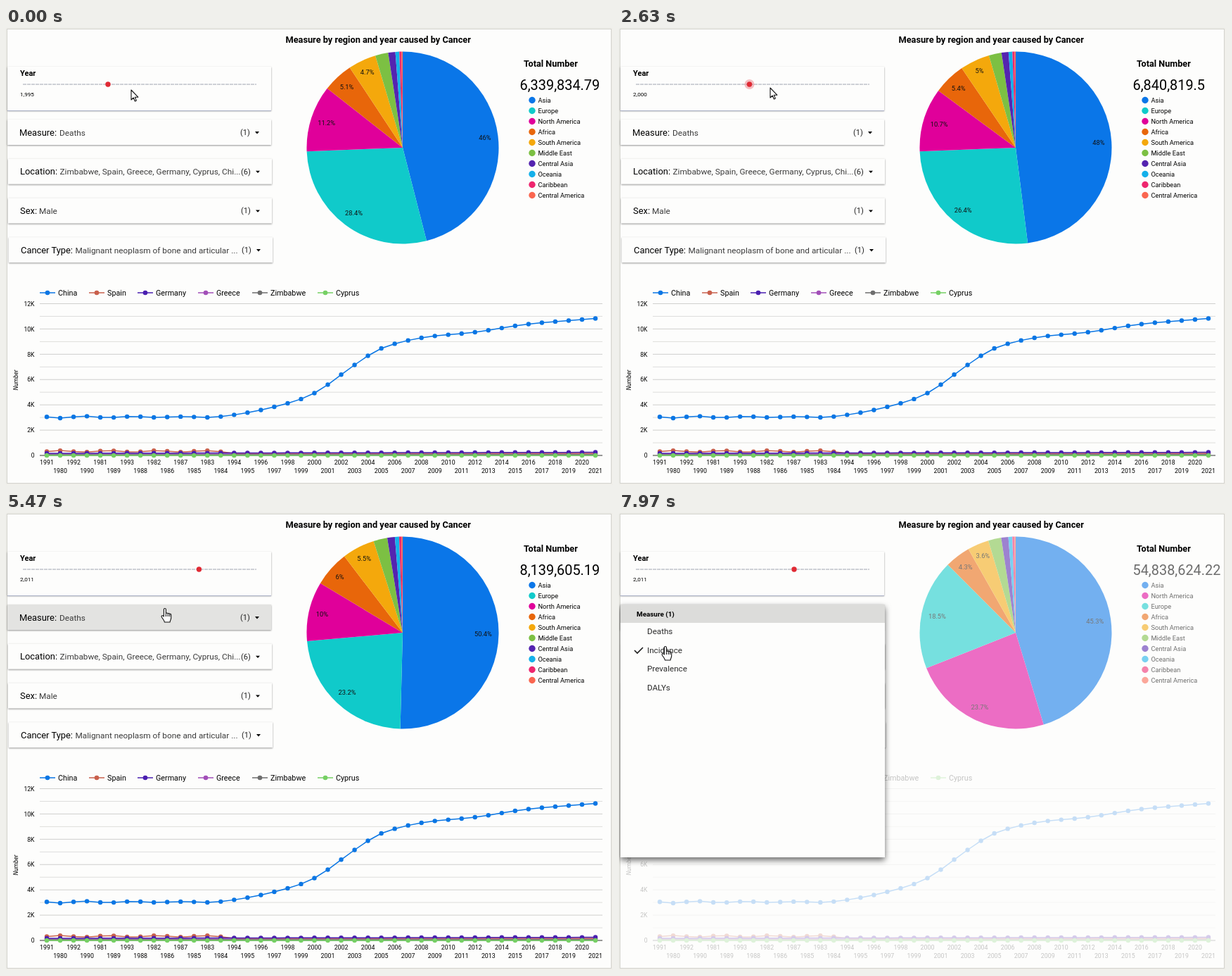
An HTML page for the animation above (8000 ms loop, 863x649 px).

```html
<!DOCTYPE html>
<html lang="en">
<head>
<meta charset="utf-8">
<title>Measure dashboard</title>
<style>
html, body { margin: 0; width: 100%; height: 100%; overflow: hidden; background: #efeee9; }
svg { display: block; width: 863px; height: 649px; font-family: Roboto, sans-serif; }
.card { fill: #fdfdfc; filter: drop-shadow(0 1px 1px rgba(0, 0, 0, .42)); }
.popup { fill: #fdfdfc; filter: drop-shadow(0 4px 4px rgba(0, 0, 0, .58)); }
</style>
</head>
<body>
<svg id="stage" viewBox="0 0 863 649" xmlns="http://www.w3.org/2000/svg"></svg>
<script>
const LOOP = 8000, FADE_MS = 250, DIM = .22;
const REGIONS = {
  'Asia': '#0a76e8', 'Europe': '#10caca', 'North America': '#e0009a', 'Africa': '#e8660a',
  'South America': '#f4a80c', 'Middle East': '#7cc043', 'Central Asia': '#5424b0',
  'Oceania': '#14b0ea', 'Caribbean': '#ee266e', 'Central America': '#fa6650'
};
const names = Object.keys(REGIONS);
const swapped = ['Asia', 'North America', 'Europe', ...names.slice(3)];

// Each result replaces the previous one after a loading phase: dim at `asked`, return at `from`.
const RESULTS = [
  { asked: -2000, from: -1000, total: '6,339,834.79', order: names, top: [46, 28.4, 11.2, 5.1, 4.7] },
  { asked: 1050, from: 1850, total: '6,840,819.5', order: names, top: [48, 26.4, 10.7, 5.4, 5] },
  { asked: 3370, from: 4230, total: '8,139,605.19', order: names, top: [50.4, 23.2, 10, 6, 5.5] },
  { asked: 7200, from: 7860, total: '54,838,624.22', order: swapped, top: [45.3, 23.7, 18.5, 4.3, 3.6] }
];
// The five smallest regions split what is left, each about half of the one before.
const TAIL = Array.from({ length: 5 }, (_, i) => .55 ** i);
const TAIL_SUM = TAIL.reduce((a, b) => a + b);

const PRESS = 650, PRESS_AGAIN = 3000, HOVER = 5100, OPEN = 5950, CHOOSE = 7150;
const MOVES = [
  { start: 100, end: 520, x: 146, y: 80 }, { start: PRESS, end: 1050, x: 188, y: 80 },
  { start: 1700, end: 2200, x: 215, y: 85 }, { start: 2640, end: 2900, x: 187, y: 80 },
  { start: PRESS_AGAIN, end: 3420, x: 274, y: 80 }, { start: 4300, end: 5200, x: 226, y: 136 },
  { start: 6000, end: 6700, x: 66, y: 190 }
];

const ramp = (t, a, b) => Math.min(1, Math.max(0, (t - a) / (b - a)));
const ease = k => k * k * (3 - 2 * k);

const text = (x, y, size, str, extra = '') =>
  `<text x="${x}" y="${y}" font-size="${size}" ${extra}>${str}</text>`;
const rect = (x, y, w, h, extra) => `<rect x="${x}" y="${y}" width="${w}" height="${h}" ${extra}/>`;
const dot = (x, y, r, fill, extra = '') => `<circle cx="${x}" cy="${y}" r="${r}" fill="${fill}" ${extra}/>`;
const line = (x1, y1, x2, y2, stroke, w = 1) =>
  `<path d="M${x1} ${y1}L${x2} ${y2}" stroke="${stroke}" stroke-width="${w}"/>`;
const group = (id, body, extra = '') => `<g id="${id}" ${extra}>${body}</g>`;
const BOLD = 'font-weight="700"', MID = 'text-anchor="middle"';

function textWidth(str, size) {
  const em = { '.': .263, '%': .737 };
  return [...str].reduce((sum, c) => sum + (em[c] || .562), 0) * size;
}

function pie({ order, top }) {
  const cx = 564, cy = 170, R = 136.5;
  const rest = 100 - top.reduce((a, b) => a + b);
  const shares = [...top, ...TAIL.map(w => rest * w / TAIL_SUM)];
  const angle = p => p / 100 * 2 * Math.PI;
  const rim = p => `${cx + R * Math.sin(angle(p))} ${cy - R * Math.cos(angle(p))}`;
  let used = 0, slices = '', labels = '';
  shares.forEach((part, i) => {
    slices += `<path d="M${cx} ${cy}L${rim(used)}A${R} ${R} 0 ${+(part > 50)} 1 ${rim(used + part)}Z" fill="${REGIONS[order[i]]}"/>`;
    if (i < top.length) {
      // push the label outwards until its far corner meets an inner circle
      const label = part + '%', a = angle(used + part / 2), hw = textWidth(label, 9.3) / 2, hh = 4;
      const b = hw * Math.abs(Math.sin(a)) + hh * Math.abs(Math.cos(a));
      const r = Math.sqrt(b * b + 127 * 127 - hw * hw - hh * hh) - b;
      labels += text(cx + r * Math.sin(a), cy - r * Math.cos(a) + 3.4, 9.3, label, MID + ' fill="#111"');
    }
    used += part;
  });
  return slices + labels;
}

const result = (r, i) => group('result' + i, pie(r) + text(730.5, 88, 19.9, r.total) +
  r.order.map((n, k) => dot(748, 102.5 + k * 15, 4.7, REGIONS[n]) + text(756.5, 106 + k * 15, 9.25, n)).join(''));

function filter(row, x, label, value, valueX, count) {
  const y = 130 + row * 55.7, right = x + 331;
  return rect(x, y, 375, 36, `id="card${row}" class="card"`) + group('filter' + row,
    text(x + 17, y + 22.5, 12.9, label) + text(valueX, y + 22.5, 11.8, value, 'fill="#3c3c3c"') +
    text(right, y + 22, 11, `(${count})`, 'fill="#222"') +
    `<path d="M${right + 21} ${y + 17}h6l-3 3.4z"/>`);
}

// Smooth curve through a few [x, y] points
function curve(points) {
  const slope = i => {
    const a = points[Math.max(0, i - 1)], b = points[Math.min(points.length - 1, i + 1)];
    return (b[1] - a[1]) / (b[0] - a[0]);
  };
  return x => {
    const i = Math.max(0, points.findIndex(p => p[0] >= x) - 1);
    const [x0, y0] = points[i], [x1, y1] = points[i + 1];
    const h = x1 - x0, s = (x - x0) / h;
    return y0 + (y1 - y0) * ease(s) + h * s * (1 - s) * (slope(i) * (1 - s) - slope(i + 1) * s);
  };
}

function lineChart() {
  const early = [1991, 1980, 1992, 1990, 1981, 1989, 1993, 1988, 1982, 1986, 1987, 1985, 1983, 1984];
  const years = [...early, ...Array.from({ length: 28 }, (_, i) => 1994 + i)];
  const px = i => 58 + i * 780 / 41;
  const wave = i => i < early.length ? Math.cos((i - 1) * 2 * Math.PI / 3.6) : 0;
  const rise = curve([[0, 552.5], [11, 552.3], [13, 552], [17, 538], [20, 518.5], [23, 478.5],
    [25, 455], [28, 440], [32, 432], [36, 420.5], [41, 412.5]]);
  const series = [
    ['China', '#0a76e4', 48, i => rise(i) + 1.8 * wave(i) * Math.exp(-i / 7)],
    ['Greece', '#a24fb8', 273, () => 605],
    ['Zimbabwe', '#6e6e6e', 350, () => 606],
    ['Spain', '#c9604c', 118, i => i < early.length ? 601.2 - 1.1 * wave(i) : 604],
    ['Germany', '#4a1fb0', 187, i => 604 - i * .035],
    ['Cyprus', '#76d064', 443, () => 607]
  ];
  let out = '';
  for (let k = 0; k <= 12; k++) {
    const y = 607 - k * 17.96;
    out += line(48, y, 848, y, k ? (k % 2 ? '#dededc' : '#cfcfcd') : '#333');
    if (k % 2 === 0) out += text(40.5, y + 3.2, 8.6, k ? k + 'K' : '0', 'text-anchor="end"');
  }
  years.forEach((yr, i) => { out += text(px(i), i % 2 ? 632 : 620, 8.8, yr, MID); });
  out += text(0, 0, 8.4, 'Number', MID + ' font-style="italic" transform="translate(17 500) rotate(-90)"');
  for (const [name, color, lx, height] of series) {
    const pts = years.map((_, i) => [px(i), height(i)]);
    out += `<path d="M${pts.join('L')}" fill="none" stroke="${color}" stroke-width="1.5"/>` +
      pts.map(p => dot(...p, 3.2, color)).join('') +
      line(lx, 376, lx + 22, 376, color, 1.5) + dot(lx + 11, 376, 3.3, color) + text(lx + 26, 379.7, 10.75, name);
  }
  return out;
}

const tick = (id, y) => `<path id="${id}" d="M22 ${y}l4 4 8-8" fill="none" stroke="#1c1c1c" stroke-width="1.6"/>`;
const popup = rect(2, 130, 376, 359, 'class="popup"') + rect(2, 130, 376, 26, 'fill="#dcdcda"') +
  text(25, 147, 9.9, 'Measure (1)', BOLD) +
  ['Deaths', 'Incidence', 'Prevalence', 'DALYs'].map((n, i) =>
    text(40, 172.2 + i * 26.5, 11.65, n, 'fill="#2c2c2c"')).join('') +
  tick('tickDeaths', 168) + tick('tickIncidence', 195);

const finger = x => `M${x} 7.5v3.5`, knuckle = x => `M${x}-4.5V1`;
const POINTERS = {
  arrow: ['M0 0V14l3.2-3 2.2 5 2-.9-2.1-4.9H9.8Z', ''],
  grab: ['M-3.5 8.5L-7 2.5C-8 0-5.5-.8-4-.2V-5c0-2 2.6-2 2.8-.2 0-2.6 2.7-2.6 2.8 0 .4-1.7 2.6-1.4 2.7.4 .5-1.4 2.4-1 2.4.7V2c0 3-1.7 4.5-2 6.5Z',
    [-1.2, 1.6, 4.3].map(knuckle).join('')],
  point: ['M-1.6 1C-1.6-1 1.4-1 1.4 1V7c.4-1.4 2.6-1.2 2.8.2.5-1.2 2.3-.8 2.5.5.6-.9 2-.4 2 1V13c0 2.2-1.4 3.5-1.6 6H-.6C-.8 16.5-3.5 14-4.8 11.4-5.4 9.8-3.4 9-1.6 11Z',
    [1.4, 4.2, 6.7].map(finger).join('')]
};

document.getElementById('stage').innerHTML =
  rect(1.5, 1.5, 859, 645, 'fill="#fdfdfc" stroke="#d2d2cd"') +
  text(397.5, 20.5, 12.75, 'Measure by region and year caused by Cancer', BOLD) +
  text(736, 55, 12.65, 'Total Number', BOLD) +
  RESULTS.map(result).join('') +
  rect(2, 55, 375, 62, 'class="card"') + line(2, 117.5, 377, 117.5, '#acb2c8') +
  text(20, 68.3, 11, 'Year', BOLD) +
  '<path d="M24 80H356" stroke="#9fa4b0" stroke-dasharray="5 1"/>' +
  group('thumb', dot(0, 0, 7, '#e3303a', 'id="halo" opacity=".3"') + dot(0, 0, 3.7, '#e02a34')) +
  '<text id="yearLabel" x="20" y="97.3" font-size="8.1"></text>' +
  filter(0, 2, 'Measure:', 'Deaths', 76, 1) +
  filter(1, 3, 'Location:', 'Zimbabwe, Spain, Greece, Germany, Cyprus, Chi...', 76.5, 6) +
  filter(2, 3, 'Sex:', 'Male', 47, 1) +
  filter(3, 4, 'Cancer Type:', 'Malignant neoplasm of bone and articular ...', 98.5, 1) +
  group('chart', lineChart()) + group('popup', popup) +
  group('cursor', Object.entries(POINTERS).map(([id, [outline, creases]]) => group(id,
    `<path d="${outline}" fill="#fff"/><path d="${creases}" fill="none"/>`)).join(''),
    'stroke="#111" stroke-width="1.1" stroke-linejoin="round"');

const el = id => document.getElementById(id);
const show = (id, on) => el(id).setAttribute('display', on ? 'inline' : 'none');
const fade = (id, v) => el(id).setAttribute('opacity', v);
const move = (id, x, y) => el(id).setAttribute('transform', `translate(${x} ${y})`);

const dimming = (t, asked, from) =>
  1 - (1 - DIM) * (ramp(t, asked, asked + FADE_MS) - ramp(t, from, from + FADE_MS));

function cursorAt(t) {
  let x = 178, y = 88;
  for (const m of MOVES) {
    const k = ease(ramp(t, m.start, m.end));
    x += (m.x - x) * k;
    y += (m.y - y) * k;
  }
  return { x, y };
}

function render(t) {
  const opacity = Math.min(...RESULTS.map(r => dimming(t, r.asked, r.from)));
  const current = RESULTS.filter(r => r.from <= t).length - 1;
  RESULTS.forEach((_, i) => { show('result' + i, i === current); fade('result' + i, opacity); });
  fade('filter0', opacity);
  fade('chart', dimming(t, RESULTS[3].asked, LOOP));

  const year = Math.round(1995 + 5 * ease(ramp(t, PRESS, 1050)) + 11 * ease(ramp(t, PRESS_AGAIN, 3420)));
  const rescaled = t >= 7700;
  el('yearLabel').textContent = year.toLocaleString('en-US');
  move('thumb', rescaled ? 249 : 145 + (year - 1995) * 8.09, 80);
  show('halo', t > 480 && t < 3500);

  const chosen = t >= CHOOSE;
  el('card0').style.fill = t >= HOVER ? '#e3e3e1' : '';
  show('popup', t >= OPEN);
  show('tickDeaths', !chosen);
  show('tickIncidence', t >= 6650);
  el('tickIncidence').setAttribute('stroke', chosen ? '#1c1c1c' : '#b9bdaf');

  const { x, y } = cursorAt(t);
  const overThumb = (t > 480 && t < 1700) || (t > 2850 && t < 4300);
  const shape = overThumb ? 'grab' : t >= HOVER ? 'point' : 'arrow';
  move('cursor', x, y);
  Object.keys(POINTERS).forEach(id => show(id, id === shape));
}

const start = performance.now();
function frame() {
  render((performance.now() - start) % LOOP);
  requestAnimationFrame(frame);
}
frame();
</script>
</body>
</html>
```
